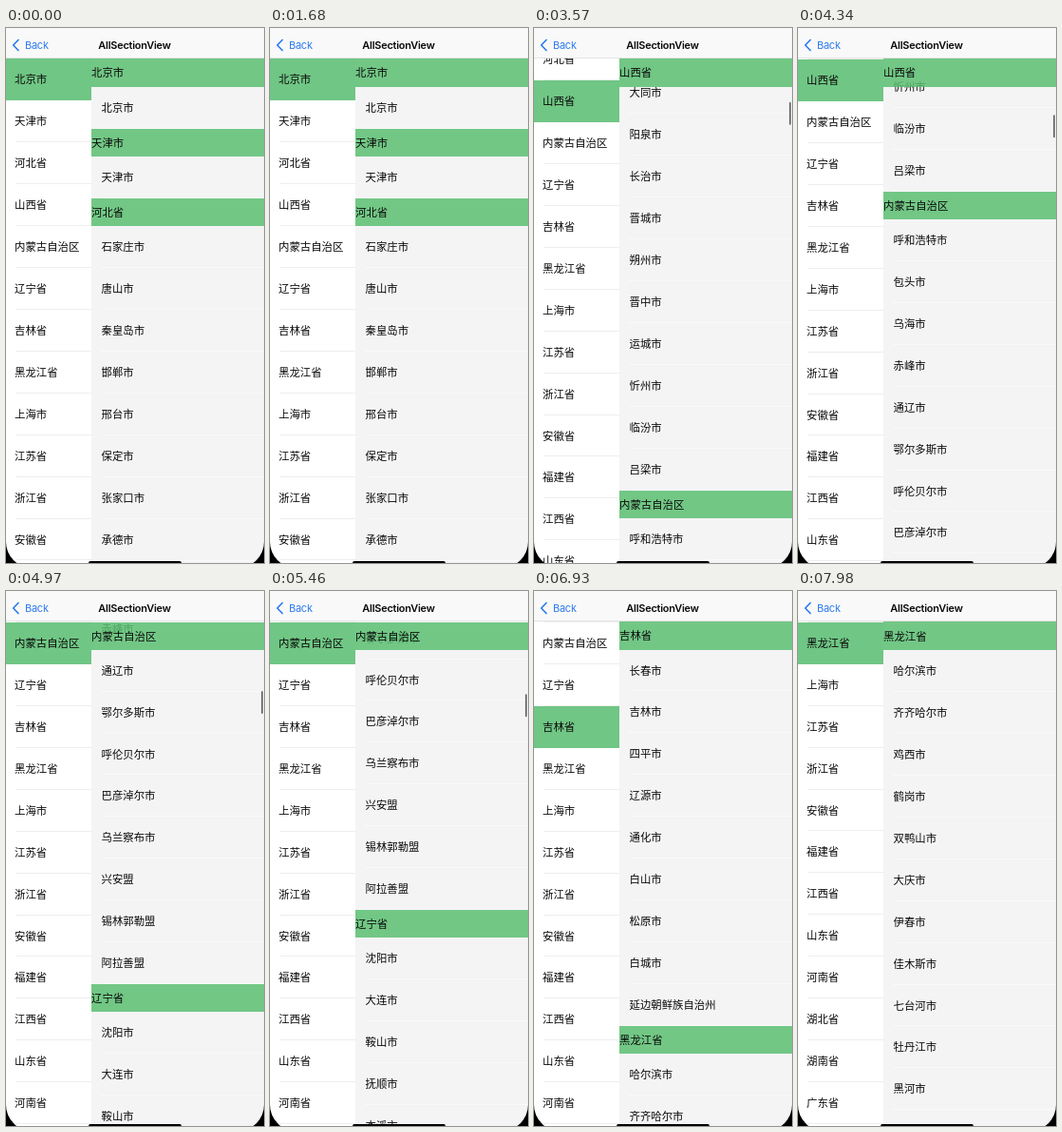
Write an HTML page that moves like this. It is 272 px wide and 562 px high and loops after 8 s.

```html
<!DOCTYPE html>
<html lang="zh-CN">
<head>
<meta charset="utf-8">
<title>AllSectionView</title>
<style>
  :root { --row: 43.93px; --head: 29.3px; --top: 32.4px; }
  html, body { margin: 0; width: 100%; height: 100%; overflow: hidden; background: #fff; }
  #stage {
    position: relative; width: 272px; height: 562px; overflow: hidden;
    font: 11.4px "Noto Sans CJK SC", "Noto Sans CJK", sans-serif; color: #0a0a0a; white-space: nowrap;
  }
  #bar {
    position: absolute; inset: 0 0 auto; height: var(--top); box-sizing: border-box;
    background: #f9f9f9; border-bottom: 1px solid #e4e4e4;
    font: 11px/36px Inter, Roboto, sans-serif; letter-spacing: -.25px;
  }
  #bar svg { position: absolute; left: 6px; top: 11px; }
  #back { position: absolute; left: 20px; color: #2f7bf0; }
  #title { position: absolute; left: 0; width: 271px; text-align: center; font-weight: 600; }
  .list { position: absolute; top: var(--top); bottom: 0; overflow: hidden; }
  #left { left: 0; width: 90px; background: #fff; }
  #right { left: 90px; right: 0; background: #f4f4f4; }
  .row { position: relative; height: var(--row); line-height: var(--row); }
  .row::after {
    content: ""; position: absolute; left: 10px; right: 0; bottom: 0; height: 1px; background: #eee;
  }
  #left .row { padding-left: 9px; }
  #left .row.on { background: #70c684; }
  #left .row.on::after { background: none; }
  #right .row { padding-left: 10.5px; }
  #right .row::after { background: #f9f9f9; }
  .head {
    position: sticky; top: 0; z-index: 1; height: var(--head); line-height: var(--head);
    background: rgba(92, 191, 115, .86);
  }
  #thumb {
    position: absolute; left: 269px; top: 0; width: 2px; height: 24px;
    border-radius: 1px; background: rgba(0, 0, 0, .5);
  }
  #corners {
    position: absolute; left: 0; right: 0; top: -60px; bottom: -5px;
    border-radius: 27px; box-shadow: 0 0 0 40px #000;
  }
  #home {
    position: absolute; left: 87px; width: 98px; top: 560px; height: 4px;
    border-radius: 2px; background: #000;
  }
</style>
</head>
<body>
<div id="stage">
  <div id="left" class="list"></div>
  <div id="right" class="list"></div>
  <div id="thumb"></div>
  <div id="bar">
    <svg width="9" height="14" viewBox="0 0 9 14" fill="none" stroke="#2f7bf0" stroke-width="1.7"
      stroke-linecap="round" stroke-linejoin="round"><path d="M7 1.5 1.7 7 7 12.5"/></svg>
    <span id="back">Back</span>
    <div id="title">AllSectionView</div>
  </div>
  <div id="corners"></div>
  <div id="home"></div>
</div>
<script>
const LOOP = 8000, STEP = 70, ROW = 43.93, HEAD = 29.3;

const provinces = ('北京市 天津市 河北省 山西省 内蒙古自治区 辽宁省 吉林省 黑龙江省 上海市 江苏省 浙江省 ' +
  '安徽省 福建省 江西省 山东省 河南省 湖北省 湖南省 广东省 广西壮族自治区 海南省').split(' ');

// Names without a suffix get 市.
const cities = [
  '北京', '天津',
  '石家庄 唐山 秦皇岛 邯郸 邢台 保定 张家口 承德 沧州 廊坊 衡水',
  '太原 大同 阳泉 长治 晋城 朔州 晋中 运城 忻州 临汾 吕梁',
  '呼和浩特 包头 乌海 赤峰 通辽 鄂尔多斯 呼伦贝尔 巴彦淖尔 乌兰察布 兴安盟 锡林郭勒盟 阿拉善盟',
  '沈阳 大连 鞍山 抚顺 本溪 丹东 锦州 营口 阜新 辽阳 盘锦 铁岭 朝阳 葫芦岛',
  '长春 吉林 四平 辽源 通化 白山 松原 白城 延边朝鲜族自治州',
  '哈尔滨 齐齐哈尔 鸡西 鹤岗 双鸭山 大庆 伊春 佳木斯 七台河 牡丹江 黑河 绥化 大兴安岭地区'
].map(s => s.split(' ').map(c => /[盟区]$|自治州$/.test(c) ? c : c + '市'));

const $ = id => document.getElementById(id);
const left = $('left'), right = $('right'), thumb = $('thumb');

function add(parent, cls, text = '') {
  const el = document.createElement('div');
  el.className = cls;
  el.textContent = text;
  return parent.appendChild(el);
}

const rows = provinces.map(p => add(left, 'row', p));
const tops = [];
let y = 0;
cities.forEach((names, i) => {
  const section = add(right, 'section');
  add(section, 'head', provinces[i]);
  names.forEach(n => add(section, 'row', n));
  tops.push(y);
  y += HEAD + names.length * ROW;
});

const clamp = v => Math.min(1, Math.max(0, v));
const ease = v => (v = clamp(v), v * v * (3 - 2 * v));
const mix = (a, b, k) => a + (b - a) * k;
const flick = (from, dist, ms) => from + dist * (1 - Math.exp(-ms / 500));

// Flicks that slow down, then taps that glide to a section.
const FLICK1 = 2870, HOLD = 3990, FLICK2 = 4130, TAP1 = 6580, TAP2 = 7280;
const held = flick(264, 603, HOLD - FLICK1);
const rest = flick(held, 669, TAP1 - FLICK2);

function rightAt(t) {
  if (t < FLICK1) return 0;
  if (t < FLICK2) return flick(264, 603, Math.min(t, HOLD) - FLICK1);
  if (t < TAP1) return flick(held, 669, t - FLICK2);
  if (t < TAP2) return mix(rest, tops[6], ease((t - TAP1) / 350));
  return mix(tops[6], tops[7], ease((t - TAP2) / 350));
}

// [start, duration, row brought to the top]
const moves = [[2788, 300, 2], [3420, 300, 3], [4530, 300, 4], [7630, 350, 7]];

function leftAt(t) {
  if (t < FLICK1) return 0;
  return ROW * moves.reduce((pos, [at, ms, row]) => mix(pos, row, ease((t - at) / ms)), 0);
}

// [time, highlighted row]
const picks = [[0, 0], [FLICK1, 2], [3402, 3], [4530, 4], [TAP1, 6], [TAP2, 7]];

function draw(now) {
  const time = now % LOOP;
  const t = Math.floor(time / STEP) * STEP;
  const pos = rightAt(t);
  const picked = picks.filter(p => t >= p[0]).pop()[1];
  left.scrollTop = leftAt(t);
  right.scrollTop = pos;
  rows.forEach((r, i) => r.classList.toggle('on', i === picked));
  thumb.style.transform = `translateY(${46.5 + pos * .0434}px)`;
  thumb.style.opacity = t < FLICK1 ? 0 : clamp((TAP1 - t) / 140);
}

const start = performance.now();
function tick() {
  draw(performance.now() - start);
  requestAnimationFrame(tick);
}
tick();
</script>
</body>
</html>
```
